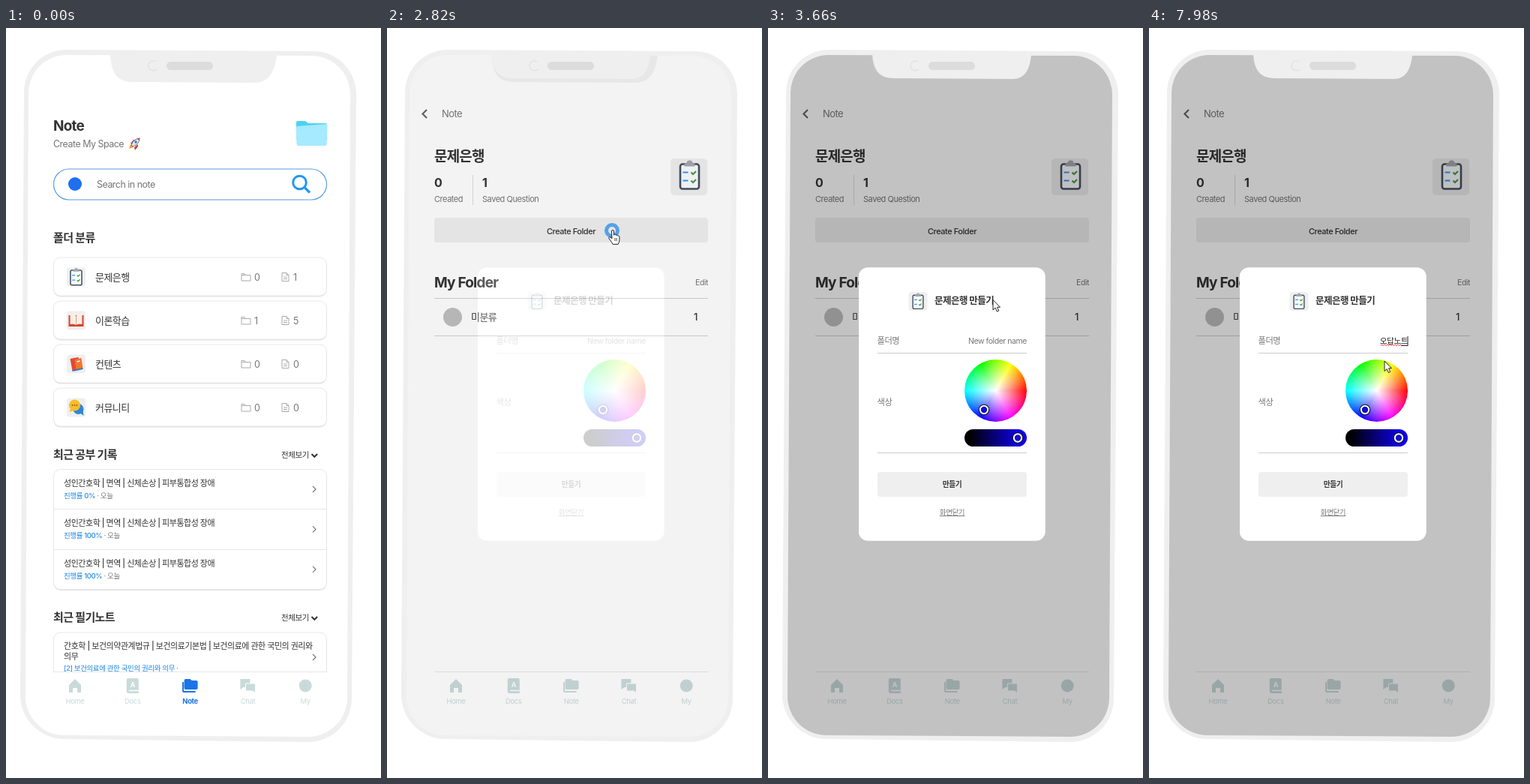
An HTML page that plays this animation: 500 px wide and 1000 px high, repeating every 8 s.

```html
<!DOCTYPE html>
<html lang="ko">
<head>
<meta charset="utf-8">
<style>
html, body { margin: 0; width: 100%; height: 100%; overflow: hidden; background: #fff; }
svg { display: block; width: 500px; height: 1000px; }
text { font-family: Inter, "Noto Sans CJK KR", "Noto Sans CJK JP", "Noto Sans CJK SC", sans-serif; letter-spacing: -.042em; white-space: pre; }
#wheel { width: 83px; height: 83px; border-radius: 50%;
  background: radial-gradient(closest-side, #fff, #fff0), conic-gradient(from 90deg, red, #f0f, #00f, #0ff, #0f0, #ff0, red); }
</style>
</head>
<body>
<svg id="stage" viewBox="0 0 500 1000"></svg>
<script>
const DARK = '#333', GREY = '#777', BLUE = '#1e88e5', TAB = '#c9dada';

const text = (x, y, size, str, fill = DARK, weight = 400, extra = '') =>
  `<text x="${x}" y="${y}" font-size="${size}" fill="${fill}" font-weight="${weight}" ${extra}>${str}</text>`;
const rect = (x, y, w, h, r, fill, extra = '') =>
  `<rect x="${x}" y="${y}" width="${w}" height="${h}" rx="${r}" fill="${fill}" ${extra}/>`;
const line = (d, stroke, width = 1, extra = '') =>
  `<path d="${d}" fill="none" stroke="${stroke}" stroke-width="${width}" ${extra}/>`;
const shape = (d, fill, extra = '') => `<path d="${d}" fill="${fill}" ${extra}/>`;
const circle = (x, y, r, fill, extra = '') => `<circle cx="${x}" cy="${y}" r="${r}" fill="${fill}" ${extra}/>`;
const at = (x, y, body, scale = 1, extra = '') =>
  `<g transform="translate(${x} ${y}) scale(${scale})" ${extra}>${body}</g>`;
const card = (y, h) => rect(63.5, y + 1.5, 364, h, 9, '#e2e2e2') +
  rect(63.5, y, 364, h, 9, '#fff', 'stroke="#e8e8e8"');
const MIDDLE = 'text-anchor="middle"', END = 'text-anchor="end"';

// Icons, centred on 0,0
const clipboard =
  rect(-12.5, -15, 25, 33, 3, '#fafcff', 'stroke="#465061" stroke-width="2.6"') +
  shape('M-7 -12V-16H-4A4 4 0 0 1 4 -16H7V-12Z', '#a5a8ad') +
  line('M-9 -4H-2M-9 7H-2', '#3399f3', 2.2) +
  line('M2 -4l2.5 2.5 4-4M2 7l2.5 2.5 4-4', '#4c9a3f', 2.2);
const openBook =
  shape('M-10 -7H10V8H-10Z', '#d8412f') +
  shape('M-8 -8Q-3 -9 0 -6Q3 -9 8 -8V5Q3 4 0 6Q-3 4 -8 5Z', '#fbeee2') + line('M0 -6V6', '#c9a58e');
const books =
  shape('M-8 -7L3 -9 5 7 -5 9Z', '#e2492f') + shape('M-2 -6L7 -8 9 6 0 8Z', '#f2762e') +
  line('M1 -3l4-1', '#fff', 1.6) + line('M-5 9l5-1 9-2', '#3e78b8', 2);
const bubbles =
  circle(3, 2, 7, '#2f86d8') + shape('M5 7l5 4-1-7z', '#2f86d8') +
  circle(-2, -3, 7.5, '#f8bd2c') + shape('M-7 1l-2 5 6-2z', '#f8bd2c') +
  [-5, -2, 1].map(x => circle(x, -3, .9, '#8b5a12')).join('');
const rocket =
  shape('M-7 7L-5 1 -1 5Z', '#f79a25') + shape('M-5 0l4-5 4 1-5 6zM0 5l5-4 0 3-4 5z', '#d63a3a') +
  shape('M-4 2Q-1 -6 7 -7 7 1 -2 4Z', '#dfe7ef', 'stroke="#43566b" stroke-width=".8"') +
  circle(2, -2, 1.7, '#2e7fc4') + shape('M4 -6.3L7.5 -7.5 6.5 -4Z', '#d63a3a');
const smallFolder = line('M-6 -4.5h4l1.5 2H6V5H-6ZM-6 -2.5H6', '#aaa');
const smallDoc = line('M-4.5 -5.5h6l3 3V5.5h-9ZM1.5 -5.5v3h3M-2.5 0h5M-2.5 2.5h5', '#aaa');
const tile = (x, y, icon, scale) => rect(x - 12.5, y - 12.5, 25, 25, 4, '#efefef') + at(x, y, icon, scale);

const tabIcons = {
  Home: '<path d="M-8 -1L0 -9 8 -1V9H3V3H-3V9H-8Z"/>',
  Docs: '<path d="M-8 -8q0-2 2-2H6q2 0 2 2V10H-5q-3 0-3-3Z"/>' + line('M-5 6.5H8', '#fff', 1.5) +
    text(0, 2, 9, 'A', '#fff', 700, MIDDLE),
  Note: '<path d="M-6 -9h6l2 2h6q2 0 2 2v8q0 2-2 2h-14q-2 0-2-2v-10q0-2 2-2z"/>' +
    '<path d="M-10.5 -5h2V7H7v2H-8.500q-2 0-2-2z"/>',
  Chat: '<path d="M-10 -9H3V2H-6l-4 3Z"/><path d="M-3 -3H10V10l-3-3H-3Z" stroke="#fff"/>',
  My: '<circle r="8.5"/>'
};
const tabs = rect(40, 858, 400, 50, 0, '#fff') + line('M63 858.500H428', '#e6e6e6') +
  Object.entries(tabIcons).map(([name, icon], i) =>
    `<g id="tab${name}" fill="${TAB}">${at(92 + i * 76.8, 877, icon)}` +
    `<text x="${92 + i * 76.8}" y="900.5" font-size="9.5" ${MIDDLE}>${name}</text></g>`).join('');

const folderRow = ([name, icon, scale, folders, docs], i) => {
  const y = 332 + i * 58;
  return card(y - 26, 51) + tile(93.5, y, icon, scale) + text(119, y + 4.5, 13, name, DARK, 500) +
    at(320, y, smallFolder) + text(331, y + 4.5, 12.5, folders, GREY) +
    at(372.5, y, smallDoc) + text(383, y + 4.5, 12.5, docs, GREY);
};
const chevron = y => line(`M409 ${y - 4}l4 4-4 4`, '#777', 1.2);
const recordRow = (progress, i) => {
  const y = 611 + i * 53.4;
  return text(77, y, 11, '성인간호학 | 면역 | 신체손상 | 피부통합성 장애', DARK, 500) +
    text(77, y + 16, 9.5, `진행률 ${progress}%<tspan fill="#777" font-weight="400"> · 오늘</tspan>`, BLUE, 500) +
    chevron(y + 4) + (i ? line(`M64 ${Math.round(y - 23) + .5}H427`, '#e8e8e8') : '');
};
const section = (y, title) => text(63, y, 15, title, DARK, 700) +
  text(367, y - 1, 10.5, '전체보기', DARK, 500) + line(`M407.5 ${y - 6}l3.800 3.800 3.800-3.800`, DARK, 2);

const notePage =
  text(63, 137, 19, 'Note', DARK, 700) + text(63, 159, 12.5, 'Create My Space', GREY) + at(171, 154, rocket) +
  shape('M387 126q0-2 2-2h10l4 3h23q2 0 2 2v20h-41z', '#4cd3ee') +
  shape('M386.500 133q0-2 2-2l38-3q2 0 2 2l-1 25q0 2-2 2h-36q-2 0-2-2z', '#a5eaff') +
  rect(63.5, 188, 364, 41, 20.5, '#fff', 'stroke="#5a9be3" stroke-width="1.2"') +
  circle(92, 208, 9, '#1f6ff0') + text(121, 212.5, 12.5, 'Search in note', GREY) +
  circle(391.5, 206, 8.8, 'none', 'stroke="#2196f3" stroke-width="3"') + line('M398 212.500l7 7', '#2196f3', 3.2) +
  text(63, 285, 15, '폴더 분류', DARK, 700) +
  [['문제은행', clipboard, .6, 0, 1], ['이론학습', openBook, 1, 1, 5],
   ['컨텐츠', books, 1, 0, 0], ['커뮤니티', bubbles, 1, 0, 0]].map(folderRow).join('') +
  section(574, '최근 공부 기록') + card(588.5, 160) + [0, 100, 100].map(recordRow).join('') +
  section(791, '최근 필기노트') + card(806, 80) +
  text(77, 828, 11, '간호학 | 보건의약관계법규 | 보건의료기본법 | 보건의료에 관한 국민의 권리와', DARK, 500) +
  text(77, 842, 11, '의무', DARK, 500) + chevron(839) +
  text(77, 857, 9.5, '[2] 보건의료에 관한 국민의 권리와 의무 ·', BLUE);

const folderPage =
  line('M53 109l-5.500 5.500 5.500 5.500', '#666', 2.2) + text(73, 119, 13, 'Note', GREY) +
  text(63, 178, 19, '문제은행', DARK, 700) +
  text(63, 212, 16, '0', DARK, 700) + text(63, 232, 11, 'Created', GREY) + line('M114.500 196V236', '#ddd') +
  text(127, 212, 16, '1', DARK, 700) + text(127, 232, 11, 'Saved Question', GREY) +
  rect(378, 174, 49, 49, 5, '#efefef') + at(403.5, 196.5, clipboard) +
  rect(63, 253, 365, 33, 4, '#efefef') + text(245.5, 274.5, 11, 'Create Folder', DARK, 500, MIDDLE) +
  text(63, 346, 19, 'My Folder', DARK, 700) + text(428, 343, 10.5, 'Edit', GREY, 400, END) +
  line('M63 360.500H428M63 410.500H428', '#d0d0d0') +
  circle(87.5, 385.5, 12.5, '#bfbfbf') + text(112, 390, 13, '미분류', DARK, 500) + text(409, 390, 13, '1', DARK, 500);

const knob = (x, y) => circle(x, y, 7.3, '#111') + circle(x, y, 5.2, '#1010d0', 'stroke="#fff" stroke-width="2"');
const modal =
  rect(121, 319.5, 248.5, 364, 12, '#fff') + tile(200, 364.5, clipboard, .55) +
  text(222, 368, 12.5, '문제은행 만들기', DARK, 700) +
  text(145.5, 421, 11.3, '폴더명', GREY, 500) +
  text(345, 421, 10.5, 'New folder name', GREY, 400, END + ' id="placeholder"') +
  text(345, 421, 10.6, '', '#222', 400, END + ' id="typed"') +
  line('M336 423.500H345', '#222', 1, 'id="composing"') +
  line('M309 423.500' + 'l1.750-1.500 1.750 1.500'.repeat(8), '#e5382d', 1, 'id="squiggle"') +
  line('M345 411V424', '#222', 1, 'id="caret"') +
  line('M146 433.500H345M146 566.500H345', '#ccc') + text(145.5, 503, 11.3, '색상', GREY, 500) +
  '<foreignObject x="261.5" y="441.5" width="83" height="83"><div id="wheel"></div></foreignObject>' + knob(288, 509) +
  rect(262, 535, 83, 23, 11.5, 'url(#blues)') + knob(333, 546.5) +
  rect(146, 592, 199, 33, 4, '#efefef') + text(245.5, 611.5, 9.7, '만들기', DARK, 700, MIDDLE) +
  text(245.5, 649, 9.5, '화면닫기', GREY, 400, MIDDLE + ' text-decoration="underline"');

const screen = 'M78 36L410 37A52 52 0 0 1 459 90L455 893A52 52 0 0 1 403 945L78 943A52 52 0 0 1 26 890L30 88A51 51 0 0 1 78 36Z';
const hole = 'M133 319.500H357.500a12 12 0 0 1 12 12V671.500a12 12 0 0 1-12 12H133a12 12 0 0 1-12-12V331.500a12 12 0 0 1 12-12Z';

const pointers = {
  arrow: '<path d="M0 0V13.500L3.200 10.600 5.300 15.500 7.700 14.500 5.600 9.700H9.500Z" fill="#fff" stroke="#222"/>',
  hand: '<path d="M-.5 1a1.500 1.500 0 0 1 3 0V6l1.200-.8q1.200 0 1.400 1l1.400-.2q1 .2 1.100 1h1.300q1 .4 1 1.400v4q0 3-1.800 6h-7q-1-2.500-5-7.500-.8-1.600.4-2.200 1.200-.4 3.500 2z" fill="#fff" stroke="#222"/>' +
    line('M4 10v4M6.200 10v4', '#222', .8),
  beam: line('M-3 -6.500H-1L0 -5.500 1 -6.500H3M0 -5.500V5.500M-3 6.500H-1L0 5.500 1 6.500H3', '#222', 1.2)
};

document.getElementById('stage').innerHTML =
  '<defs><linearGradient id="blues"><stop offset=".08"/><stop offset=".9" stop-color="#1000f0"/></linearGradient></defs>' +
  shape('M80 29L412 31A56 58 0 0 1 467 90L461 893A58 58 0 0 1 402 952L78 948A59 59 0 0 1 19 888L24 86A57 57 0 0 1 80 29Z', '#efefef') +
  shape(screen, '#fff') +
  `<g id="notePage">${notePage}</g><g id="folderPage">${folderPage}</g>${tabs}` +
  `<g id="status">${rect(38, 891, 136, 16, 0, '#e9e9fb', 'opacity=".9"')}<text x="43" y="904" font-size="10.5" fill="#888" style="font-family:Roboto,sans-serif;letter-spacing:0">sample.test/…/listview.ph…</text></g>` +
  shape('M139 34C140 60 148 72 170 72L330 73C350 73 358 60 361 36Z', '#efefef', 'id="wideNotch"') +
  shape(screen + hole, '#000', 'id="dim" fill-rule="evenodd"') +
  shape('M139 34C140 56 148 67 168 67L326 68C342 68 349 56 351 36Z', '#efefef') +
  line('M200 45A6.500 6.500 0 1 0 201 55', '#e0e0e0', 1.2) + rect(214, 45, 62, 11, 5.5, '#dcdcdc') +
  `<g id="modal">${modal}</g>` +
  '<circle id="ring" fill="none" stroke="#2f8fef"/><g id="pointer"></g>';

const $ = id => document.getElementById(id);
const show = (id, on) => $(id).style.display = on ? '' : 'none';
const ramp = (t, a, b) => Math.min(1, Math.max(0, (t - a) / (b - a)));
const ease = p => p * p * (3 - 2 * p);
const latest = (list, t) => list.filter(item => item[0] <= t).pop();

const PAGE_CHANGE = 1440, FOCUS = 4030;
const path = [[720, 300, 480], [1150, 143, 330], [1800, 143, 330], [2400, 300, 270],
  [3250, 300, 270], [3950, 300, 417], [7300, 300, 417], [7800, 314, 444], [8000, 314, 444]];
const kinds = [[720, 'hand'], [PAGE_CHANGE, 'beam'], [1900, 'arrow'], [2150, 'hand'],
  [3300, 'arrow'], [3860, 'beam'], [7380, 'arrow']];
const clicks = [[1250, 143, 330], [2760, 300, 270], [FOCUS, 300, 417]];
const keys = [[4950, 'ㅇ'], [5150, '오'], [5400, '옫'], [5600, '오다'], [5900, '오답'],
  [6250, '오답ㄴ'], [6450, '오답노'], [6700, '오답놑'], [6900, '오답노트']];

function pointerAt(t) {
  const i = path.findIndex(p => p[0] > t);
  const [t0, x0, y0] = path[i - 1], [t1, x1, y1] = path[i];
  const p = ease(ramp(t, t0, t1));
  return [x0 + (x1 - x0) * p, y0 + (y1 - y0) * p];
}

function draw(t) {
  const inFolder = t >= PAGE_CHANGE;
  show('notePage', !inFolder);
  show('folderPage', inFolder);
  $('tabNote').setAttribute('fill', inFolder ? TAB : '#1a73e8');
  $('tabNote').setAttribute('font-weight', inFolder ? 400 : 700);
  $('status').style.opacity = ramp(t, 900, 1000) * (1 - ramp(t, 1700, 1900));

  const open = ramp(t, 2790, 2950);
  $('dim').style.opacity = .24 * open;
  $('wideNotch').style.opacity = 1 - open;
  $('modal').style.opacity = open;

  const key = latest(keys, t), typed = key ? key[1] : '';
  $('typed').textContent = typed;
  show('placeholder', !typed);
  show('composing', typed);
  show('squiggle', typed.length === 4);
  show('caret', t >= FOCUS && (t - (key ? key[0] : FOCUS)) % 1060 < 530);

  const click = latest(clicks, t), age = click ? t - click[0] : 999;
  show('ring', age < 300);
  if (age < 300) {
    const attrs = { cx: click[1], cy: click[2], r: 3.7 + age * .0625,
      'stroke-width': 5.5 - age * .008, opacity: 1 - age / 300 };
    for (const name in attrs) $('ring').setAttribute(name, attrs[name]);
  }

  const kind = latest(kinds, t);
  show('pointer', kind);
  if (kind) {
    $('pointer').innerHTML = pointers[kind[1]];
    $('pointer').setAttribute('transform', `translate(${pointerAt(t)})`);
  }
}

function tick() {
  draw(performance.now() % 8000);
  requestAnimationFrame(tick);
}
tick();
</script>
</body>
</html>
```
